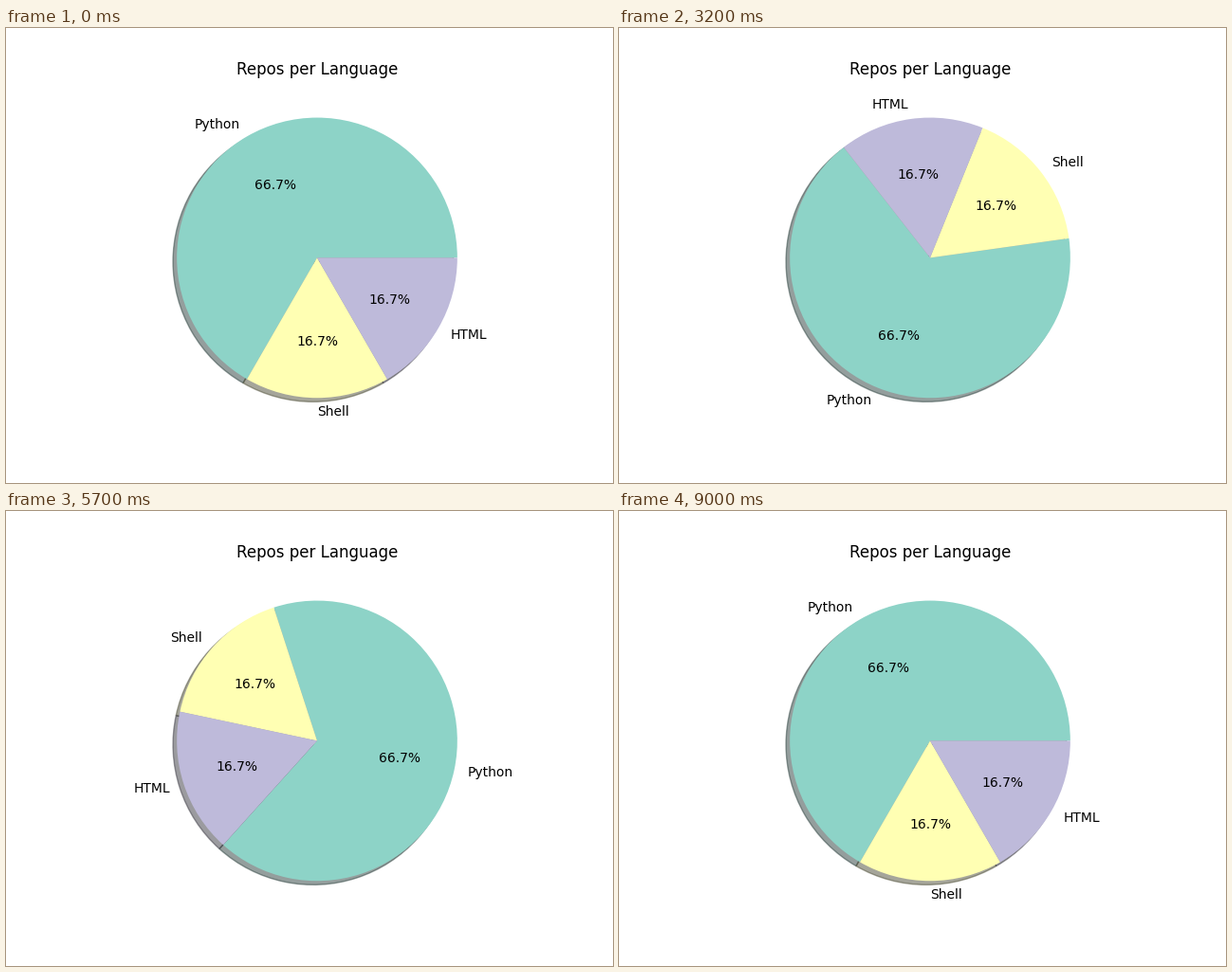
A matplotlib script for the animation above (9100 ms loop, 640 px wide and 480 px high).

```python
import matplotlib.pyplot as plt
from matplotlib.animation import FuncAnimation

LANGUAGES = ["Python", "Shell", "HTML"]
REPOS = [4, 1, 1]
COLORS = plt.get_cmap("Set3").colors[:3]
STEP = 4  # degrees per frame
FRAMES = 360 // STEP + 1

fig, ax = plt.subplots(figsize=(6.4, 4.8), dpi=100)


def draw(i):
    ax.clear()
    ax.pie(REPOS, labels=LANGUAGES, colors=COLORS, autopct="%1.1f%%",
           shadow=True, startangle=i * STEP)
    ax.set_title("Repos per Language")


anim = FuncAnimation(fig, draw, frames=FRAMES, init_func=lambda: None,
                     interval=100, repeat=True, repeat_delay=0)
plt.show()
```
